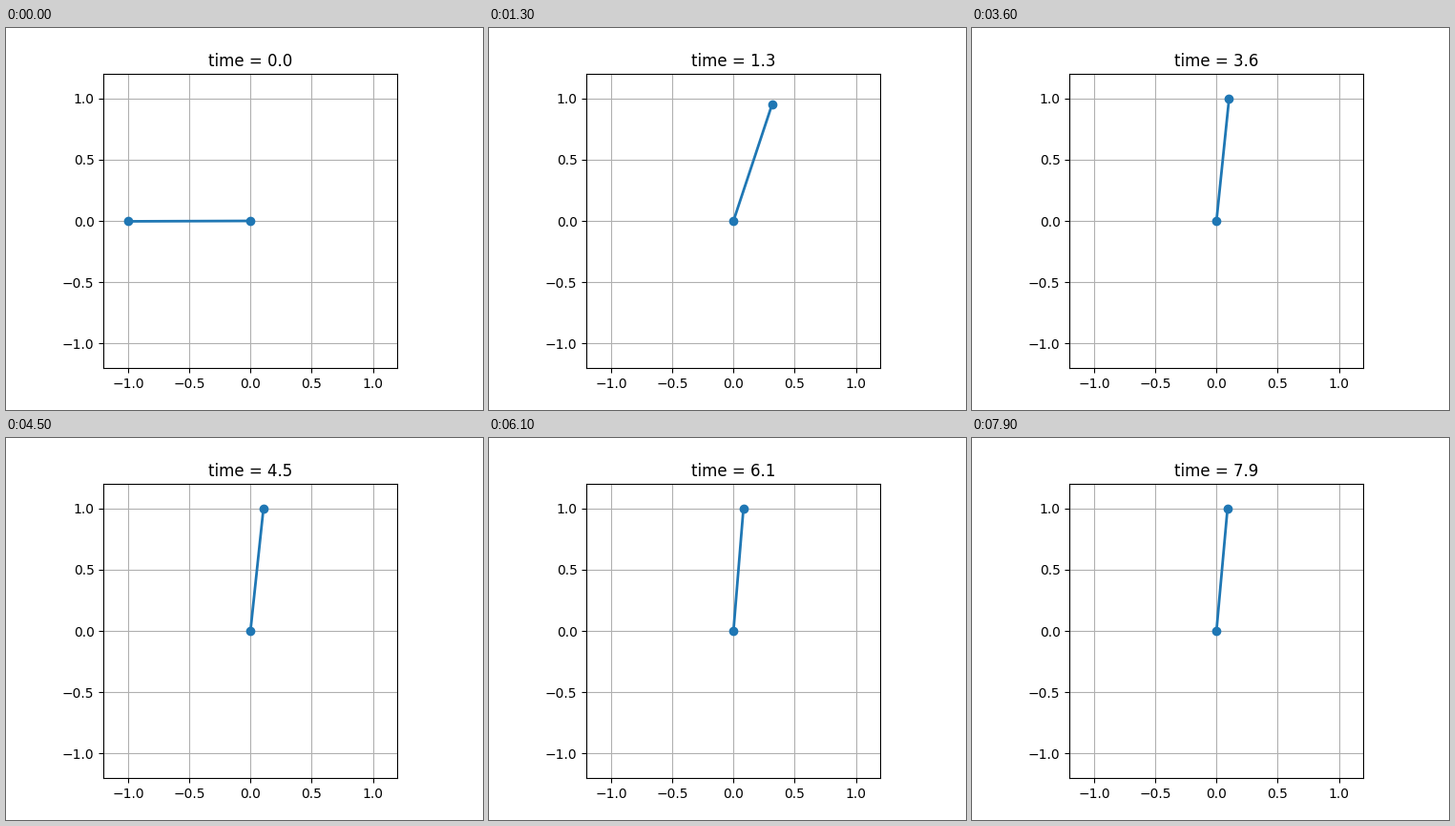
A matplotlib script for the animation above (8000 ms loop, 500 by 400 pixels).

```python
import numpy as np
import matplotlib.pyplot as plt
from matplotlib.animation import FuncAnimation

DT = 0.1
FRAMES = 80
START, REST = -89.8, 174.95  # degrees from hanging down


def ring(t):
    """Damped wobble around the resting angle."""
    return 15.8 * np.exp(-0.6 * t) * np.sin(np.pi / 2 * (t - 1.3))


def angle(t):
    """Swing through the bottom up to REST, then settle."""
    swing = REST + ring(0) - START
    return np.radians(REST - swing / np.cosh(2.035 * t) ** 1.5 + ring(t))


fig = plt.figure(figsize=(5, 4), dpi=100)
ax = fig.add_subplot(xlim=(-1.2, 1.2), ylim=(-1.2, 1.2))
ax.set_aspect("equal")
ticks = np.arange(-1, 1.1, 0.5)
ax.set_xticks(ticks)
ax.set_yticks(ticks)
ax.grid()
rod, = ax.plot([], [], "o-", lw=2)
title = ax.set_title("")


def update(frame):
    t = frame * DT
    th = angle(t)
    rod.set_data([0, np.sin(th)], [0, -np.cos(th)])
    title.set_text(f"time = {t:.1f}")
    return rod, title


anim = FuncAnimation(fig, update, frames=FRAMES, interval=1000 * DT,
                     repeat=True, repeat_delay=0, blit=False)
plt.show()
```
